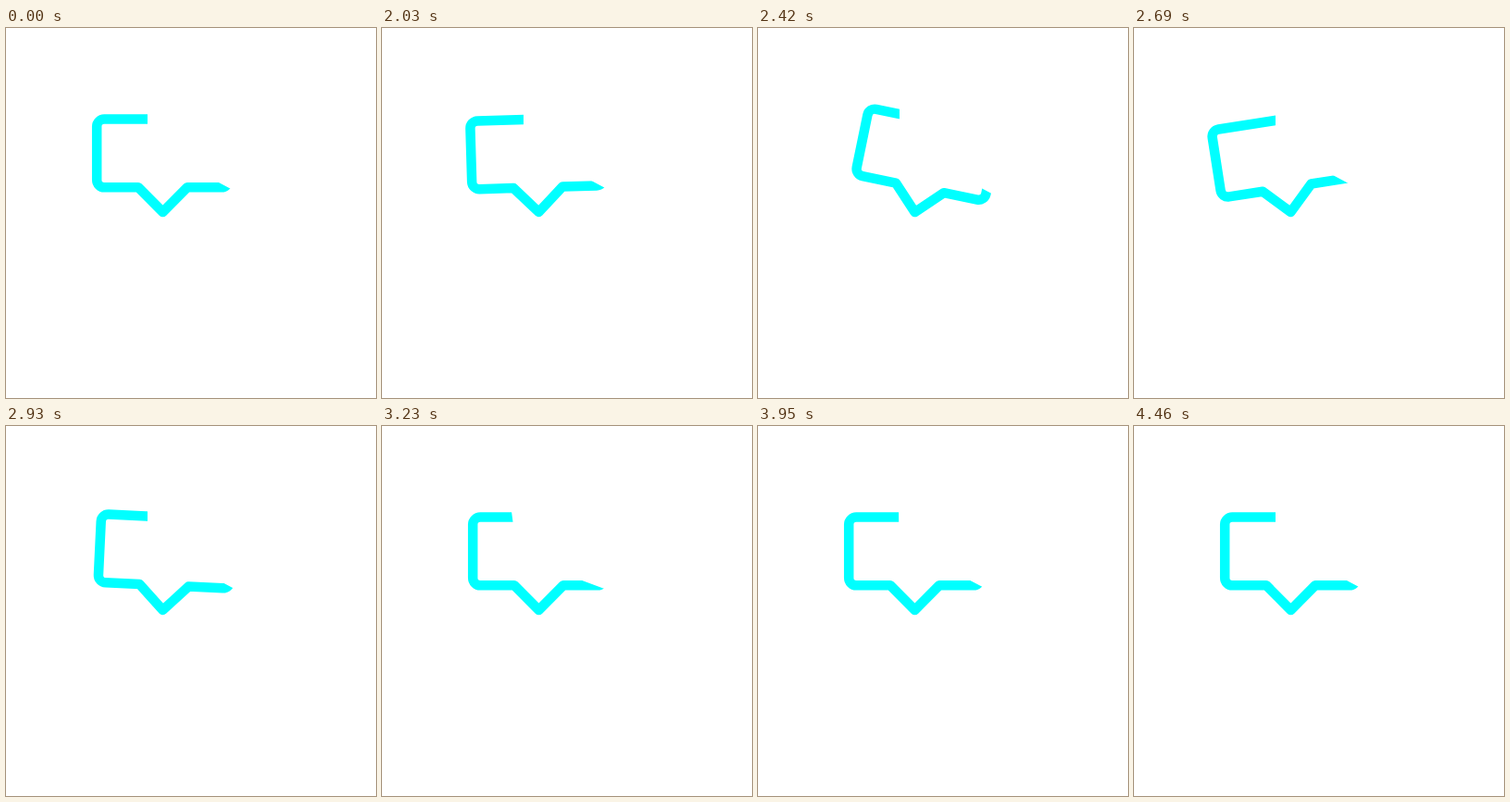
These frames come from a looping animation (400 px wide and 400 px high, 4550 ms). An HTML page:

```html
<!DOCTYPE html>
<html lang="en">
<head>
<meta charset="utf-8">
<title>Speech bubbles</title>
<style>
  html, body { margin: 0; width: 100%; height: 100%; overflow: hidden; background: #fff; }
  svg { display: block; width: 100vw; height: 100vh; }
</style>
</head>
<body>
<svg viewBox="0 0 400 400">
  <path id="back" fill="none" stroke="#0ff" stroke-width="10.5" stroke-linejoin="round"
    d="M106.2 98.5H232.8a8 8 0 0 1 8 8V164.3a8 8 0 0 1 -8 8H196L169.5 199L143 172.3H106.2a8 8 0 0 1 -8 -8V106.5a8 8 0 0 1 8 -8Z"/>
  <path id="front" fill="#fff" d="M153 70H310V150H262V184L198 150H153Z"/>
</svg>
<script>
const LOOP = 4550, START = 2030, STEP = 30, LAST = 4460;
const FRONT_DELAY = 1140;

// Damped swing: [ms, degrees]
const swing = [[1980, 0], [2250, -21], [2462, 15], [2675, -9], [2888, 3], [3110, 0]];

function angle(t) {
  const i = swing.findIndex(([ms]) => ms > t);
  if (i < 1) return 0;
  const [t0, a0] = swing[i - 1], [t1, a1] = swing[i];
  const u = (1 - Math.cos(Math.PI * (t - t0) / (t1 - t0))) / 2;
  return a0 + (a1 - a0) * u;
}

// The picture rests, then advances in even steps.
function stepped(t) {
  if (t < START) return 0;
  return Math.min(LAST, START + Math.floor((t - START) / STEP) * STEP);
}

const back = document.getElementById('back');
const front = document.getElementById('front');
const turn = (el, a, x, y) => el.setAttribute('transform', `rotate(${a} ${x} ${y})`);

function draw(now) {
  const t = stepped((now - begin) % LOOP);
  turn(back, angle(t), 169.5, 199.5);
  turn(front, angle(t - FRONT_DELAY), 262, 184);
}

const begin = performance.now();
function tick() {
  draw(performance.now());
  requestAnimationFrame(tick);
}
tick();
</script>
</body>
</html>
```
